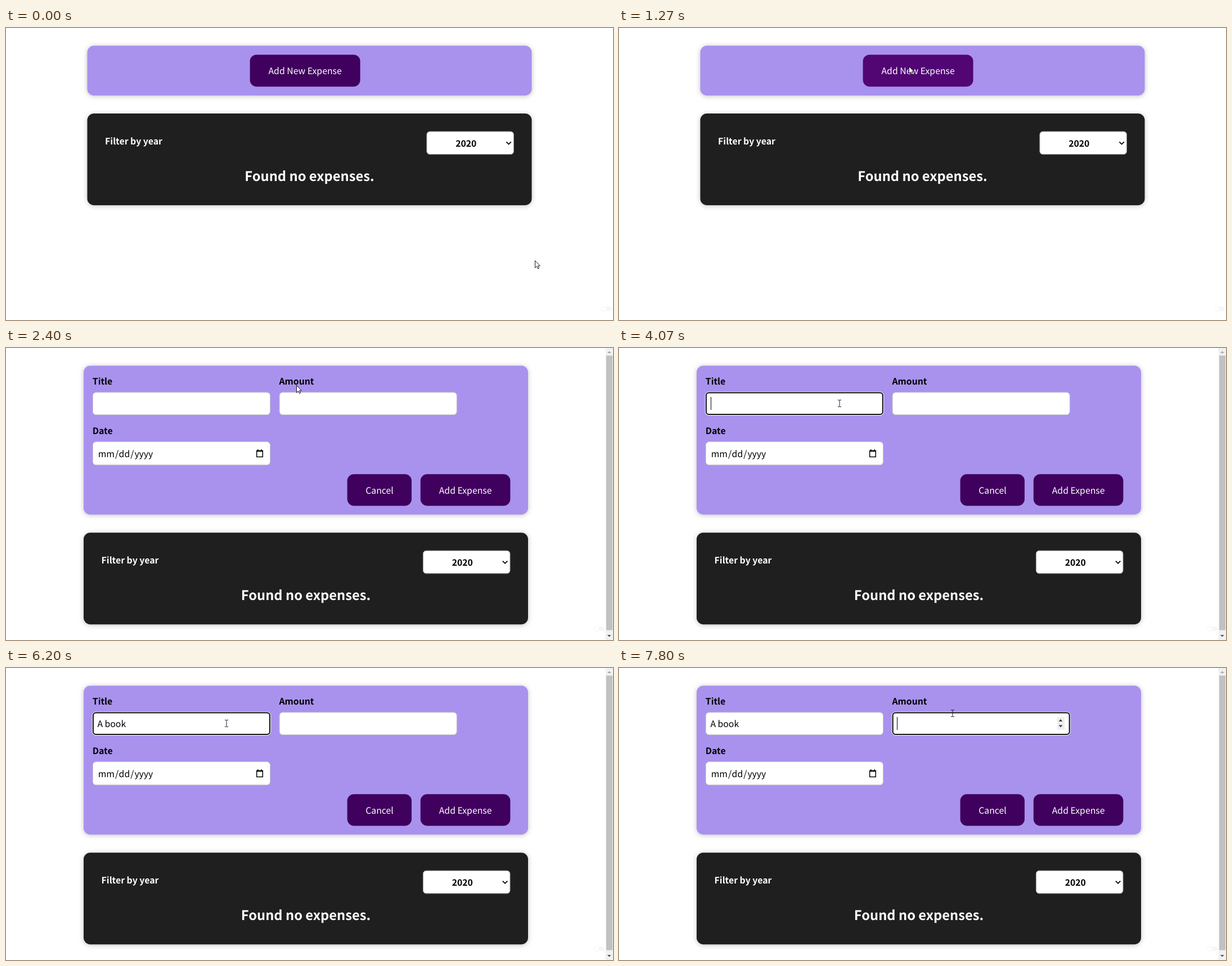
Recreate the animation shown at these times as an HTML page. Size 1079 by 519 pixels, loop 8000 ms.

```html
<!DOCTYPE html>
<html lang="en">
<head>
<meta charset="utf-8">
<title>Expense tracker</title>
<style>
  html, body { margin: 0; width: 100%; height: 100%; overflow: hidden; background: #fff; }
  svg { display: block; width: 1079px; height: 519px; }
  text {
    font: 15.8px "Noto Sans CJK JP", "Noto Sans CJK SC", "Noto Sans CJK KR", "Noto Sans CJK", "Noto Sans JP", sans-serif;
    text-rendering: geometricPrecision; white-space: pre;
  }
  .bold { font-weight: 700; }
  .big { font-size: 23.7px; font-weight: 700; }
  .mid { text-anchor: middle; }
  .light { fill: #fff; }
  .card { filter: drop-shadow(0 1px 4px rgba(0, 0, 0, .25)); }
  .violet { fill: #a892ee; }
  .btn { fill: #40005d; }
  .btn.hover { fill: #510674; }
  .field { fill: #fff; stroke: #ccc; }
  .ring { fill: none; stroke: #101010; stroke-width: 2; }
  .halo { fill: none; stroke: #fff; stroke-width: 1; }
</style>
</head>
<body>
<svg viewBox="0 0 1079 519">
  <defs>
    <g id="focus">
      <rect class="halo" x="-.5" y="-.5" width="317" height="41.5" rx="6.5"/>
      <rect class="ring" x="1" y="1" width="314" height="38.5" rx="5"/>
    </g>
  </defs>

  <g id="closed">
    <rect class="card violet" x="144.5" y="31.6" width="790" height="88.4" rx="11.85"/>
    <rect id="open" class="btn" x="433.6" y="47.4" width="196" height="56.8" rx="11.85"/>
    <text class="mid light" x="531.6" y="82">Add New Expense</text>
  </g>

  <g id="form">
    <rect class="card violet" x="138" y="31.6" width="790" height="264.4" rx="11.85"/>
    <text class="bold" x="153.8" y="65.3">Title</text>
    <text class="bold" x="485.4" y="65.3">Amount</text>
    <text class="bold" x="153.8" y="153">Date</text>
    <rect class="field" x="154.4" y="79" width="315" height="39.6" rx="5.5"/>
    <rect class="field" x="486.2" y="79" width="315" height="39.6" rx="5.5"/>
    <rect class="field" x="154.4" y="166.8" width="315" height="41" rx="5.5"/>
    <text x="163.7" y="193.6" id="date">mm<tspan dx="1">/</tspan><tspan dx="1">dd</tspan><tspan dx="1">/</tspan><tspan dx="1">yyyy</tspan></text>
    <path d="M445.7 182.5h10.6v11h-10.6zM445 183.5h12M447.8 180v3M454.2 180v3" fill="none" stroke="#000" stroke-width="1.5"/>
    <rect class="btn" x="606.6" y="224.2" width="114.4" height="56.2" rx="11.85"/>
    <rect class="btn" x="736.8" y="224.2" width="159.6" height="56.2" rx="11.85"/>
    <text class="mid light" x="664" y="258.8">Cancel</text>
    <text class="mid light" x="816.6" y="258.8">Add Expense</text>
    <text id="typed" x="162.4" y="104.8"></text>
    <use id="ring" href="#focus" y="78.6"/>
    <g id="spin">
      <rect x="778.5" y="87" width="13.5" height="22.5" fill="#efefef"/>
      <path d="M781.6 95l3.4-4 3.4 4zM781.6 101.6l3.4 4 3.4-4z" fill="#404040"/>
    </g>
    <rect id="caret" y="87" width="1" height="23"/>
  </g>

  <g id="list">
    <rect class="card" x="144.5" y="152" width="790" height="163" rx="11.85" fill="#1f1f1f"/>
    <text class="bold light" x="176.1" y="207">Filter by year</text>
    <rect class="field" x="747.9" y="184" width="154.6" height="40.6" rx="5.5" style="stroke:#999"/>
    <text class="bold mid" x="817.8" y="211">2020</text>
    <path d="M889.4 202.4l4.2 4.2 4.2-4.2" fill="none" stroke="#000" stroke-width="1.8"/>
    <text class="big mid light" x="539.5" y="272.3">Found no expenses.</text>
  </g>

  <g id="toggle">
    <rect x="1058" y="495" width="19" height="8" rx="4" fill="#f7f7f7"/>
    <circle cx="1063" cy="499" r="4.5" fill="#fff" stroke="#f6f6f6"/>
  </g>

  <g id="bar">
    <rect x="1065.5" width="14" height="519" fill="#f1f1f1"/>
    <rect x="1067" y="13.5" width="11" height="488" fill="#c1c1c1"/>
    <path d="M1069 9l3.3-3.5 3.3 3.5z" fill="#a3a3a3"/>
    <path d="M1069 510l3.3 3.5 3.3-3.5z" fill="#505050"/>
  </g>

  <path id="arrow" d="M0 0V12.8L3 10L5.1 14.4L7 13.5L5 9.3H8.8Z" fill="#fff" stroke="#000" stroke-width=".9"/>
  <path id="beam" d="M-3 -6H-.8L0 -5.4L.8 -6H3M0 -5.4V5.4M-3 6H-.8L0 5.4L.8 6H3" fill="none" stroke="#222"/>
</svg>
<script>
const LOOP = 8000, FPS = 15;
const $ = id => document.getElementById(id);
const show = (id, on) => $(id).setAttribute('display', on ? 'inline' : 'none');
const move = (id, x, y) => $(id).setAttribute('transform', `translate(${x} ${y})`);

const ease = {
  start: p => p ** 1.3,
  end: p => 1 - (1 - p) ** 2,
  both: p => p * p * (3 - 2 * p),
  hold: p => p < 1 ? 0 : 1
};

// pointer: tick, x, y, easing towards this point
const path = [
  [1, 940.5, 413.5],
  [14, 509.5, 167.5, 'start'],
  [15, 492.5, 112.5, 'hold'],
  [20, 516.5, 66.5, 'end'],
  [44, 516.5, 66.5, 'hold'],
  [50, 392, 98.5, 'both'],
  [99, 392, 98.5, 'hold'],
  [112, 589, 80.5, 'both'],
  [117, 593, 80.5, 'hold']
];

// typing: time, letters, caret x
const keys = [
  [3600, 0, 163], [4330, 1, 172], [4730, 2, 175.5], [5000, 3, 185],
  [5330, 4, 195], [5530, 5, 204], [5670, 6, 213]
];
const word = 'A book';
const FORM = 2400, AMOUNT = 7467, BLINK = 500;

function pointer(tick) {
  const i = path.findIndex(p => p[0] > tick);
  if (i === 0) return path[0].slice(1, 3);
  if (i < 0) return path.at(-1).slice(1, 3);
  const [k0, x0, y0] = path[i - 1], [k1, x1, y1, kind] = path[i];
  const p = ease[kind]((tick - k0) / (k1 - k0));
  return [x0 + (x1 - x0) * p, y0 + (y1 - y0) * p];
}

const within = (x, y, l, t, r, b) => x >= l && x <= r && y >= t && y <= b;

function draw(t) {
  const tick = Math.floor((t + 5) * FPS / 1000);
  const now = tick * 1000 / FPS + 5;
  const [x, y] = pointer(tick);
  const opened = now >= FORM, amount = now >= AMOUNT;

  show('closed', !opened);
  show('form', opened);
  show('bar', opened);
  move('list', opened ? -6.5 : 0, opened ? 176.2 : 0);
  move('toggle', opened ? -13 : 0, 0);
  $('open').classList.toggle('hover', within(x, y, 434, 48, 629, 104));

  const key = keys.filter(k => now >= k[0]).at(-1);
  const since = now - (amount ? AMOUNT : key ? key[0] : 0);
  show('ring', key);
  $('ring').setAttribute('x', amount ? 485.7 : 153.9);
  show('caret', key && Math.floor(since / BLINK) % 2 === 0);
  $('caret').setAttribute('x', amount ? 494 : key ? key[2] : 163);
  $('typed').textContent = key ? word.slice(0, key[1]) : '';

  const inTitle = within(x, y, 154, 79, 470, 119);
  const inAmount = within(x, y, 486, 79, 802, 119);
  const text = opened && (inTitle || inAmount);
  show('spin', amount || opened && inAmount);
  show('arrow', !text);
  show('beam', text);
  move(text ? 'beam' : 'arrow', x, y);
}

const begin = performance.now();
function frame() {
  draw((performance.now() - begin) % LOOP);
  requestAnimationFrame(frame);
}
draw(0);
requestAnimationFrame(frame);
</script>
</body>
</html>
```
